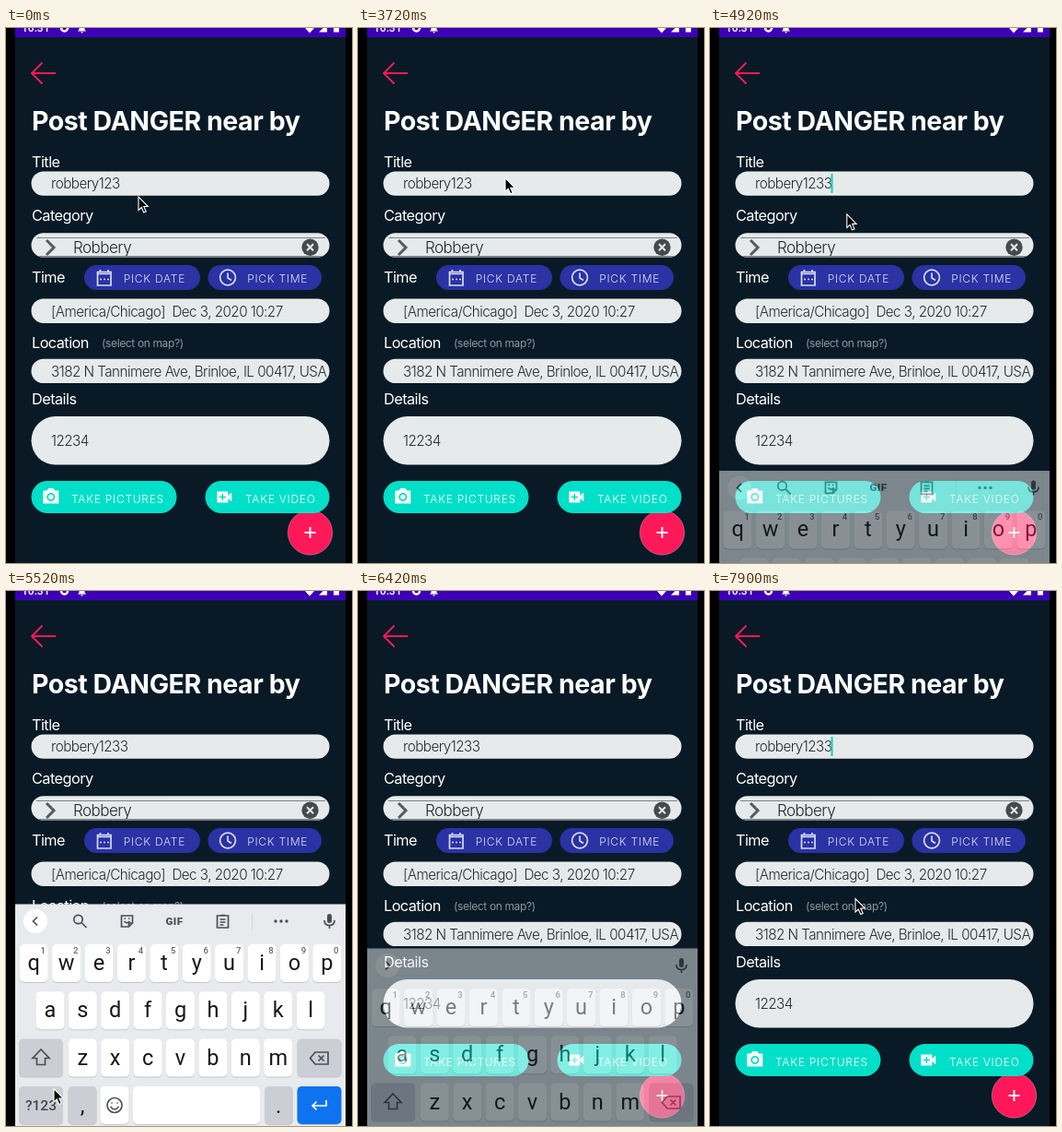
An HTML page for the animation above (8000 ms loop, 376x580 px).

```html
<!DOCTYPE html>
<html lang="en">
<head>
<meta charset="utf-8">
<title>Report form</title>
<style>
html, body { margin: 0; width: 100%; height: 100%; overflow: hidden; background: #000 }
svg { display: block }
text { font-family: Inter, Roboto, sans-serif; white-space: pre }
.head { font-size: 28.5px; font-weight: 700; letter-spacing: -.45px; fill: #fff }
.label { font-size: 16.3px; letter-spacing: -.55px; fill: #fff }
.hint { font-size: 12px; letter-spacing: -.36px; fill: #8d969c }
.value { font-size: 15.2px; font-weight: 300; letter-spacing: -.52px; fill: #22292e }
.big { font-size: 17px }
.button { font-size: 12px; font-weight: 300; letter-spacing: .75px; fill: #fff }
.dim { fill-opacity: .85 }
.key { font: 23.5px Roboto, sans-serif; fill: #15171a; text-anchor: middle }
.small { font-size: 15.5px; font-weight: 500; fill: #43484e }
.digit { font: 500 9.5px Roboto, sans-serif; fill: #5f656b; text-anchor: middle }
.gif { font: 900 11.5px Roboto, sans-serif; letter-spacing: .5px; fill: #4b5056; stroke: none; text-anchor: middle }
.line { fill: none; stroke: #4b5056; stroke-width: 1.7 }
</style>
</head>
<body>
<svg width="376" height="580" viewBox="0 0 376 580">
  <clipPath id="screen"><path d="M10 0h359v580H10z"/></clipPath>
  <g clip-path="url(#screen)">
    <path fill="#091a26" d="M0 0h376v580H0z"/>
    <path fill="#3d00b8" d="M0 0h376v10H0z"/>
    <g fill="#fff">
      <text x="17" y="4" style="font:500 12px Roboto,sans-serif">10:31</text>
      <circle cx="63.5" cy="0" r="3.5" fill="none" stroke="#fff" stroke-width="2.5"/>
      <path d="M78 3.5l1.5-2v-4h6v4l1.5 2zM81 4.3h3l-1.5 1.5zM325 0h10l-5 5.5zM340 4.5l9-9v9zM356-3h6v7.500h-6z"/>
    </g>
    <path d="M54 49H28.500M39.500 37.500L28 49l11.500 11.500" fill="none" stroke="#f21a55" stroke-width="2"/>
    <circle cx="330.5" cy="547" r="24.2" fill="#ff1859" stroke="#fff" stroke-opacity=".3"/>
    <path d="M324.500 547h12M330.500 541v12" stroke="#fff" stroke-width="1.9"/>
    <g id="form"></g>
    <g fill="none" stroke="#555c60">
      <path d="M33 227.500H347M36 247.500H343" stroke="#7c8387"/>
      <path d="M44 230l8 8-8 8" stroke-width="3"/>
    </g>
    <circle cx="330.5" cy="237.8" r="9.2" fill="#454a4d"/>
    <path d="M327 234.300l7 7m0-7l-7 7" stroke="#e6eaeb" stroke-width="2"/>
    <g fill="none" stroke="#d9dcf2" stroke-width="1.7">
      <path d="M99.500 264.500H114V279H99.500zM99.500 266.500H114M102.500 262v3M111 262v3"/>
      <path d="M102 272.500h10" stroke-dasharray="2 2"/>
      <circle cx="241" cy="270.5" r="8.4"/>
      <path d="M241 265.500v5.500l4 2.500"/>
    </g>
    <g transform="translate(-.7 -.5)">
      <path fill="#fff" d="M41 502h4l2-2.500h5l2 2.500h4v14H41zM230 503h12v4.500l4-3.500v10l-4-3.500v4.500h-12z"/>
      <circle cx="49.5" cy="509" r="3.6" fill="#fff" stroke="#00dfc8" stroke-width="1.8"/>
      <path d="M232.500 509h7M236 505.500v7" stroke="#00dfc8" stroke-width="1.6"/>
    </g>
    <path id="caret" d="M0 158h2v21H0z" fill="#14cfb4"/>

    <g id="keyboard">
      <path fill="#e8eaed" d="M10 339.500h359V580H10z"/>
      <circle cx="32" cy="358" r="13" fill="#fff"/>
      <path id="chevron" class="line" d="M2-4.500L-2.500 0 2 4.500"/>
      <g id="tools" class="line">
        <circle cx="78.5" cy="356" r="4.7"/>
        <path d="M82 359.500l5.500 5.500"/>
        <path d="M125.500 352h12v8l-4 4h-8zM137.500 360h-4v4M128.500 358q3 3.500 6 0M128.500 355h1.500m3 0h1.500"/>
        <text x="183" y="362" class="gif">GIF</text>
        <path d="M229.500 352h12v13h-12zM233 351.500h5M232.500 356h6m-6 3h6m-6 3h4"/>
        <path d="M267.500 349v19" stroke="#d3d6da" stroke-width="1"/>
        <path d="M293 358h13" stroke-width="3.4" stroke-linecap="round" stroke-dasharray="0 6"/>
      </g>
      <rect x="349" y="350" width="5" height="10" rx="2.5" fill="#4b5056"/>
      <path class="line" d="M346 357q0 5.500 5.500 5.500t5.500-5.500M351.500 362.500v3.500"/>
      <g id="keys"></g>
      <g class="line">
        <path d="M38 497l9 9.500h-4.500v7h-9v-7H29z"/>
        <path d="M336 500h14v13h-14l-5.500-6.500zM339.500 503.500l6 6m0-6l-6 6"/>
        <circle cx="118" cy="557.5" r="8"/>
        <path d="M114 559.500q4 5 8 0M115 555h0m6 0h0" stroke-linecap="round"/>
        <path d="M348 552v6h-15M337.500 553.500L333 558l4.500 4.500" stroke="#fff"/>
      </g>
    </g>
  </g>
  <path id="mouse" d="M0 0v14.500l3.300-3L5.700 17l2.500-1-2.400-5.500h4.500z" stroke="#fff" stroke-width="1.1"/>
</svg>
<script>
const $ = id => document.getElementById(id);
const pill = (x, y, w, h, fill, r = h / 2) =>
  `<rect x="${x}" y="${y}" width="${w}" height="${h}" rx="${r}" fill="${fill}"/>`;
const text = (x, y, kind, str) => `<text x="${x}" y="${y}" class="${kind}">${str}</text>`;

const label = (y, str) => text(28, y, 'label', str);
const field = (mid, str, h = 26.4) => pill(27.5, mid - h / 2, 324, h, '#e6eaeb') + text(49, mid + 5.8, 'value', str);
const dateButton = (x, w, str) => pill(x, 257, w, 27, '#2a32a4') + text(x + 42.7, 275.5, 'button dim', str);
const mediaButton = (x, w, str) => pill(x, 491, w, 35, '#00dfc8') + text(x + 43.5, 515, 'button', str);

$('form').innerHTML = text(28, 111, 'head', 'Post DANGER near by') +
  label(150.700, 'Title') + field(168.600, 'robbery123') +
  label(209, 'Category') + field(235.400, '') + text(73, 244, 'value big', 'Robbery') +
  label(276, 'Time') + dateButton(85, 126, 'PICK DATE') + dateButton(219.500, 123.500, 'PICK TIME') +
  field(306.700, '[America/Chicago]  Dec 3, 2020 10:27') +
  label(347, 'Location') + text(104, 346, 'hint', '(select on map?)') +
  field(371.900, '3182 N Tannimere Ave, Brinloe, IL 00417, USA') +
  label(408, 'Details') + field(447.300, '12234', 52.600) +
  mediaButton(27.500, 158, 'TAKE PICTURES') + mediaButton(216.500, 135, 'TAKE VIDEO');
const title = document.querySelector('.value');

const pitch = 35.4, rowY = i => 383 + 51.3 * i;
const key = (x, i, w = 31, fill = '#fff') =>
  pill(x, rowY(i) + 1, w, 41, '#c3c6cb', 5) + pill(x, rowY(i), w, 41, fill, 5);
const greyKey = (x, i, w) => key(x, i, w, '#cbced4');
const letters = (row, i) => [...row].map((c, j) => {
  const x = 189.5 + pitch * (j - (row.length - 1) / 2);
  return key(x - 15.5, i) + text(x, rowY(i) + 28, 'key', c) +
    (i ? '' : text(x + 10, rowY(0) + 10, 'digit', (j + 1) % 10));
}).join('');
$('keys').innerHTML = ['qwertyuiop', 'asdfghjkl', 'zxcvbnm'].map(letters).join('') +
  greyKey(14, 2, 48) + greyKey(316.5, 2, 48) + greyKey(14, 3, 48) + greyKey(67.5, 3) + key(102.5, 3) +
  key(138, 3, 138) + greyKey(281, 3) + key(316.5, 3, 48, '#0d73ee') +
  text(38, 563, 'key small', '?123') + text(83, 566, 'key', ',') + text(296, 566, 'key', '.');

// Times are in ms; the screen is redrawn once per tick.
const loop = 8000, tick = 149, blink = 500, typedAt = 4660, openAt = 4619, closeAt = 6258;
const start = [144, 183];
// Mouse moves: [from, to, x, y]
const moves = [[0, 149, 138.3, 182], [3278, 3725, 160, 162.7], [4768, 5513, 52, 539.5],
  [5513, 5811, 38, 600], [6705, 7301, 198, 372], [7301, 7897, 158, 333.5]];

function ease(t, from, to) {
  const p = Math.min(1, Math.max(0, (t - from) / (to - from)));
  return p * p * (3 - 2 * p);
}
const mouseAt = t => moves.reduce(([x, y], [from, to, toX, toY]) => {
  const p = ease(t, from, to);
  return [x + (toX - x) * p, y + (toY - y) * p];
}, start);
const move = (id, x, y) => $(id).setAttribute('transform', `translate(${x} ${y})`);
const fade = (id, opacity) => $(id).setAttribute('opacity', opacity);

function draw(now) {
  const t = Math.floor((now % loop + 5) / tick) * tick;
  const typed = t > typedAt, closing = t >= closeAt;
  title.textContent = typed ? 'robbery1233' : 'robbery123';
  move('caret', typed ? 131.5 : 122.5, 0);
  fade('caret', Math.floor((t - (typed ? typedAt : 110)) / blink) % 2 ? 0 : 1);
  move('mouse', ...mouseAt(t));

  const shown = ease(t, openAt, openAt + 670) - ease(t, closeAt, closeAt + 520);
  move('keyboard', 0, 241 * (1 - shown));
  fade('keyboard', shown ** (closing ? 3 : .75));
  fade('tools', closing ? 0 : 1);
  $('chevron').setAttribute('transform', `translate(32 358) scale(${closing ? -1 : 1} 1)`);
  requestAnimationFrame(draw);
}
requestAnimationFrame(draw);
</script>
</body>
</html>
```
